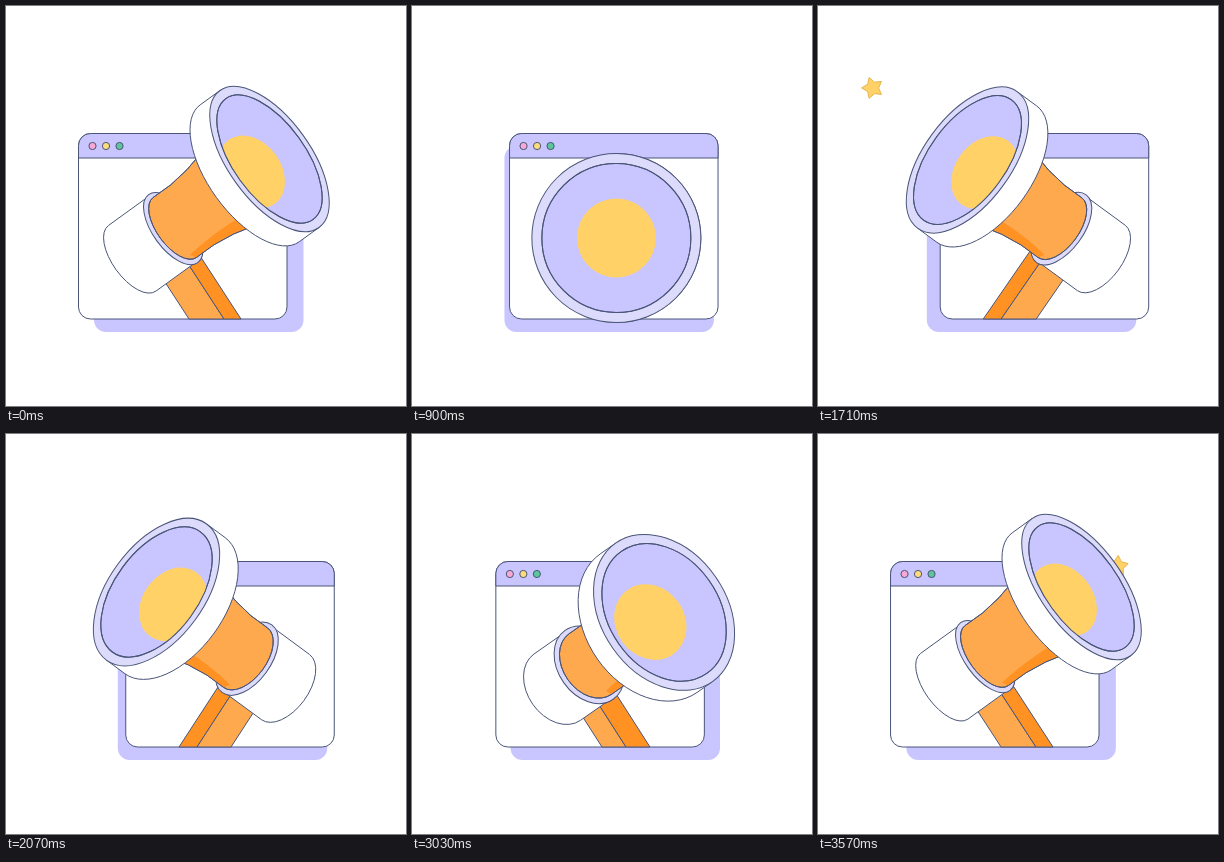
An HTML page that plays this animation: 400 by 400 pixels, repeating every 3.6 s.

```html
<!DOCTYPE html>
<html lang="en">
<head>
<meta charset="utf-8">
<title>Megaphone</title>
<style>
html, body { margin: 0; width: 100%; height: 100%; overflow: hidden; background: #fff; }
svg { display: block; width: 100vw; height: 100vh; }
.line { stroke: #4a5578; stroke-width: 1; stroke-linejoin: round; }
</style>
</head>
<body>
<svg viewBox="0 0 400 400">
  <defs><clipPath id="mouth"><ellipse id="hole"/></clipPath></defs>
  <rect id="shadow" y="140" width="209.5" height="186" rx="12" fill="#c9c5ff"/>
  <g id="win" class="line">
    <rect x=".5" y="127.5" width="208.5" height="185.5" rx="12" fill="#fff"/>
    <path d="M.5 152V139.500a12 12 0 0 1 12-12H197a12 12 0 0 1 12 12V152Z" fill="#c9c5ff"/>
    <circle cx="14.500" cy="140" r="3.600" fill="#f8a9d3"/>
    <circle cx="28" cy="140" r="3.600" fill="#ffdc7a"/>
    <circle cx="41.500" cy="140" r="3.600" fill="#5ec49c"/>
  </g>
  <path id="star" fill="#ffd166" stroke="#e5b64c" stroke-width="1" stroke-linejoin="round"/>
  <g class="line">
    <path id="stickA"/>
    <path id="stickB"/>
    <path id="barrel" fill="#fff"/>
    <ellipse id="ring" fill="#dddbfb"/>
    <path id="horn" fill="#ffa94f"/>
    <path id="shade" fill="#ff9222" stroke="none"/>
    <path id="hornLine" fill="none"/>
    <path id="rim" fill="#fff"/>
    <ellipse id="face" fill="#dddbfb"/>
    <ellipse id="inner" fill="#c9c5ff"/>
  </g>
  <g clip-path="url(#mouth)"><ellipse id="ball" fill="#ffd166"/></g>
  <ellipse id="edge" class="line" fill="none"/>
</svg>
<script>
const LOOP = 3600, FLOOR = 313;
const LIGHT = '#ffa94f', DARK = '#ff9222';
const $ = id => document.getElementById(id);

// time, mouth x, mouth y, axis x, axis y, stick left, fold, right, slope
const KEYS = [
  [0, 263.5, 153, .708, -.512, 183, 218, 235, .65],
  [555, 263.5, 180, .54, -.365, 192, 216, 241, .6],
  [750, 233, 218, .31, -.1, 193, 203, 229, .33],
  [900, 204.5, 232, 0, 0, 188, 205, 222, 0],
  [1380, 151.5, 156, -.61, -.49, 157, 179, 213, -.71],
  [1700, 149.5, 154, -.69, -.505, 165, 183, 218, -.69],
  [2070, 150.5, 158, -.665, -.49, 173, 191, 225, -.65],
  [2340, 152, 182, -.55, -.36, 178, 202, 228, -.55],
  [2550, 174, 219, -.32, -.09, 183, 210, 219, -.33],
  [2690, 199, 231, -.03, 0, 188, 206, 220, -.02],
  [3030, 252, 178.5, .55, -.385, 190, 214, 238, .64],
  [3300, 263.5, 154, .69, -.5, 186, 217, 236, .66]
];
const N = KEYS.length;

function key(i) {
  const k = KEYS[(i + N) % N], turn = Math.floor(i / N);
  return [k[0] + turn * LOOP, ...k.slice(1)];
}

// Slope at a key that never overshoots its neighbours
function slope(i, c) {
  const p = key(i - 1), k = key(i), n = key(i + 1);
  const a = (k[c] - p[c]) / (k[0] - p[0]), b = (n[c] - k[c]) / (n[0] - k[0]);
  return a * b > 0 ? 2 * a * b / (a + b) : 0;
}

function pose(t) {
  let i = N - 1;
  while (KEYS[i][0] > t) i--;
  const a = key(i), b = key(i + 1), h = b[0] - a[0];
  const u = (t - a[0]) / h, v = 1 - u;
  return a.slice(1).map((y, j) => {
    const c = j + 1;
    return y * v * v * (1 + 2 * u) + b[c] * u * u * (3 - 2 * u)
      + h * u * v * (slope(i, c) * v - slope(i + 1, c) * u);
  });
}

const pt = p => p[0].toFixed(2) + ' ' + p[1].toFixed(2);

function set(id, attrs) {
  for (const k in attrs) $(id).setAttribute(k, attrs[k]);
}

function starPath(x, y, r, spin) {
  const pts = [];
  for (let i = 0; i < 10; i++) {
    const a = spin + i * Math.PI / 5, q = i % 2 ? r * .55 : r;
    pts.push(pt([x + q * Math.cos(a), y + q * Math.sin(a)]));
  }
  return 'M' + pts.join('L') + 'Z';
}

// Thrown out from behind the mouth, then drawn back
const THROWS = [
  { from: 1390, time: 560, x: 122, y: 137, dx: -82, dy: -67 },
  { from: 3060, time: 540, x: 290, y: 139, dx: 85, dy: -59 }
];

function drawStar(t) {
  const s = THROWS.find(s => t > s.from && t < s.from + s.time);
  if (!s) return set('star', { d: '' });
  const p = (t - s.from) / s.time, k = Math.sin(Math.PI * Math.pow(p, .66));
  set('star', { d: starPath(s.x + s.dx * k, s.y + s.dy * k, 11, -1.2 + p) });
}

function draw(t) {
  const w = t / LOOP * 2 * Math.PI;
  set('win', { transform: `translate(${97 - 25 * Math.cos(w)} 0)` });
  set('shadow', { x: 99 - 12.8 * Math.cos(w - .54) });
  drawStar(t);

  const [cx, cy, dx, dy, left, fold, right, m] = pose(t);
  const len = Math.hypot(dx, dy) || 1e-6;
  const flat = Math.sqrt(1 - len * len);
  const angle = Math.atan2(dy, dx), deg = angle * 180 / Math.PI;
  const nx = -Math.sin(angle), ny = Math.cos(angle);

  // Point at depth s behind the mouth, r to the side of the axis
  const at = (s, r) => pt([cx - dx * s + nx * r, cy - dy * s + ny * r]);
  const disc = (id, s, r, squash = flat) => {
    const x = cx - dx * s, y = cy - dy * s;
    set(id, { cx: x, cy: y, rx: r * squash, ry: r, transform: `rotate(${deg} ${x} ${y})` });
  };
  const arc = (s, r) => `A${r * flat} ${r} ${deg} 0 1 ${at(s, -r)}`;
  const tube = (s1, s2, r) =>
    `M${at(s1, r)}L${at(s2, r)}${arc(s2, r)}L${at(s1, -r)}`;

  const top = 240, rise = m * (FLOOR - top);
  const strip = (a, b) =>
    `M${a} ${FLOOR}L${a - rise} ${top}H${b - rise}L${b} ${FLOOR}Z`;
  set('stickA', { d: strip(left, fold), fill: m > 0 ? LIGHT : DARK });
  set('stickB', { d: strip(fold, right), fill: m > 0 ? DARK : LIGHT });

  set('barrel', { d: tube(136, 194, 40.5) });
  disc('ring', 136, 42);

  const horn = `M${at(30, 54)}Q${at(85, 34)} ${at(134, 37)}${arc(134, 37)}`
    + `Q${at(85, -34)} ${at(30, -54)}`;
  const k = dx < 0 ? -1 : 1;
  set('horn', { d: horn + 'Z' });
  set('hornLine', { d: horn });
  set('shade', {
    d: `M${at(30, 54 * k)}Q${at(85, 34 * k)} ${at(134, 37 * k)}`
      + `L${at(138, 31 * k)}Q${at(88, 25 * k)} ${at(30, 34 * k)}Z`
  });

  set('rim', { d: tube(0, 28, 84.5) });
  disc('face', 0, 84.5);
  for (const id of ['inner', 'hole', 'edge']) disc(id, 0, 74.5);
  disc('ball', 25, 39.5, (1 + flat) / 2);
}

const start = performance.now();
function tick() {
  draw((performance.now() - start) % LOOP);
  requestAnimationFrame(tick);
}
tick();
</script>
</body>
</html>
```
